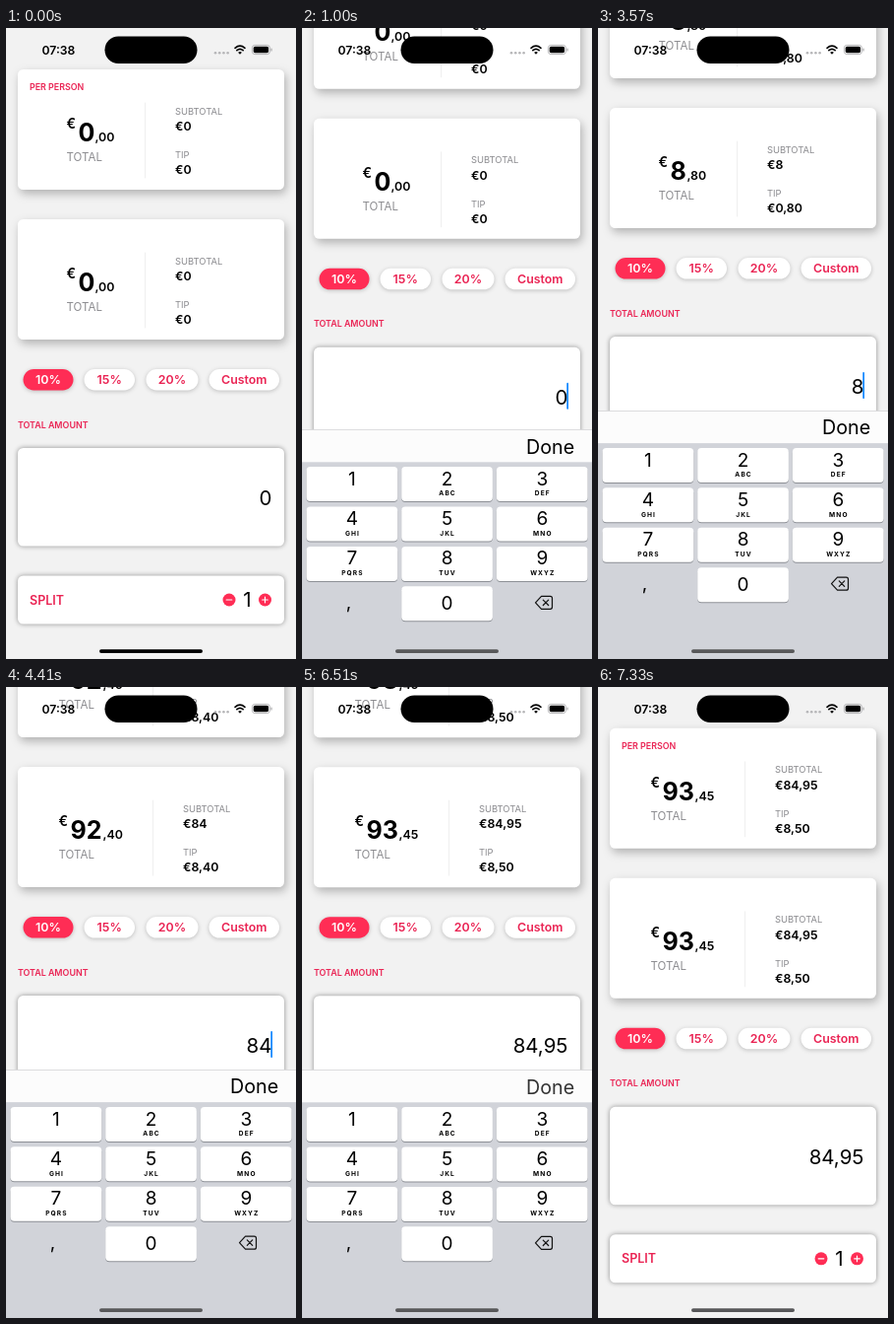
An HTML page that plays this animation: 295x640 px, repeating every 8000 ms.

```html
<!DOCTYPE html>
<html lang="en">
<head>
<meta charset="utf-8">
<title>Tip calculator</title>
<style>
  html, body { margin: 0; width: 100%; height: 100%; overflow: hidden; background: #f2f2f2; }
  svg { display: block; width: 295px; height: 640px; font-family: Inter, Roboto, sans-serif; }
  .card { fill: #fff; }
  .raised { filter: drop-shadow(2px 4px 5px rgba(0, 0, 0, .27)); }
  .outlined { filter: drop-shadow(0 0 2.5px rgba(0, 0, 0, .42)); }
  .pill { fill: #fff; filter: drop-shadow(0 1px 2px rgba(0, 0, 0, .22)); }
  .pill.on, .round { fill: #ff2d55; }
  .pink { fill: #ea2454; font-weight: 600; }
  .head { font-size: 8.9px; }
  .choice { font-size: 12.4px; text-anchor: middle; }
  .choice.on { fill: #fff; }
  .gray { fill: #8b8b8f; font-size: 9.4px; }
  .gray.big { font-size: 11.5px; }
  .sum { font-size: 12.4px; font-weight: 600; }
  .euro { font-size: 14px; font-weight: 600; }
  .whole { font-size: 25px; font-weight: 700; }
  .amount { font-size: 20.5px; text-anchor: end; }
  .key { fill: #fff; }
  .edge { fill: #8d9096; }
  .digit { font-size: 19px; text-anchor: middle; }
  .letters { font-size: 6.6px; font-weight: 700; letter-spacing: 1.1px; text-anchor: middle; }
  .line { fill: none; stroke-linecap: round; stroke-linejoin: round; }
</style>
</head>
<body>
<svg id="stage" viewBox="0 0 295 640"></svg>
<script>
const LOOP = 8000;
const stage = document.getElementById('stage');

const text = (x, y, cls, str = '', extra = '') =>
  `<text x="${x}" y="${y}" class="${cls}" ${extra}>${str}</text>`;
const box = (x, y, w, h, r, cls, extra = '') =>
  `<rect x="${x}" y="${y}" width="${w}" height="${h}" rx="${r}" class="${cls}" ${extra}/>`;
const line = (d, width, color) =>
  `<path class="line" d="${d}" stroke-width="${width}" stroke="${color}"/>`;

// Summary card; the columns spread apart as the total gets wider.
const summary = y => `<g transform="translate(0 ${y})">
  ${box(12, 0, 271, 122, 5.5, 'card raised')}
  <g class="left">
    ${text(61.5, 60, 'euro', '€')}
    ${text(73.5, 73, 'whole')}
    ${text(61.5, 93, 'gray big', 'TOTAL')}
  </g>
  ${text(90.5, 73, 'sum cents')}
  <g class="right">
    ${line('M141.5 34V110', 1, '#efefef')}
    ${text(172, 45.5, 'gray', 'SUBTOTAL')}
    ${text(172, 62, 'sum subtotal')}
    ${text(172, 90, 'gray', 'TIP')}
    ${text(172, 106, 'sum tip')}
  </g>
</g>`;

const pill = (x, w, label, on = '') =>
  box(x, 346, w, 21.5, 10.75, 'pill ' + on) +
  text(x + w / 2, 361.3, 'pink choice ' + on, label);

const stepper = (x, sign) =>
  `<circle class="round" cx="${x}" cy="580" r="6.5"/>` + line(sign, 1.2, '#fff');

const page = `<g id="page">
  ${summary(42)}
  ${text(24, 63, 'pink head', 'PER PERSON')}
  ${summary(194)}
  ${pill(17.5, 51, '10%', 'on')}${pill(79.5, 51.5, '15%')}
  ${pill(142.5, 53, '20%')}${pill(206.5, 71.5, 'Custom')}
  ${text(12, 405.5, 'pink head', 'TOTAL AMOUNT')}
  ${box(12, 426, 271, 99.5, 5.5, 'card outlined')}
  ${text(270.5, 484, 'amount', '', 'id="amount"')}
  ${box(269.3, 462, 1.7, 27, .8, '', 'id="caret" fill="#0a84ff"')}
  ${box(12, 555.5, 271, 49, 5.5, 'card outlined')}
  ${text(24, 584.5, 'pink', 'SPLIT', 'font-size="12.5"')}
  ${stepper(227, 'M224.2 580h5.6')}
  ${text(249.5, 587.3, 'amount', '1')}
  ${stepper(263.5, 'M260.7 580h5.6M263.5 577.2v5.6')}
</g>`;

const letters = ['', 'ABC', 'DEF', 'GHI', 'JKL', 'MNO', 'PQRS', 'TUV', 'WXYZ'];
const key = (n, col, row) => {
  const x = 4.5 + col * 96.7, y = 425.8 + row * 40.4, mid = x + 46.4;
  return box(x, y + 1, 92.7, 35, 4, 'edge') +
    box(x, y, 92.7, 35, 4, 'key', `id="key${n}"`) +
    text(mid, y + (n ? 18.6 : 24), 'digit', n) +
    (n ? text(mid + .5, y + 29.3, 'letters', letters[n - 1]) : '');
};

const keyboard = `<g id="keyboard">
  <rect y="388" width="295" height="34" fill="#fcfcfc"/>
  <rect y="388" width="295" height=".7" fill="#cfcfd2"/>
  ${text(228, 412.3, '', 'Done', 'id="done" font-size="19.7"')}
  <rect y="421" width="295" height="219" fill="#d1d3d9"/>
  ${letters.map((_, i) => key(i + 1, i % 3, Math.floor(i / 3))).join('')}
  ${key(0, 1, 3)}
  ${text(47.5, 569.5, 'digit', ',')}
  <path id="erase" class="line" stroke="#111" stroke-width="1.2"
    d="M243.5 557H252.5Q254.5 557 254.5 559V568Q254.5 570 252.5 570H243.5L237.5 563.5Z"/>
  <path id="cross" class="line" stroke-width="1.2" d="M245.3 560.8l5.4 5.4m0-5.4l-5.4 5.4"/>
</g>`;

const dots = [213, 217.2, 221.4, 225.6]
  .map(x => `<circle cx="${x}" cy="25.3" r="1.3" fill="#b5b5b7"/>`).join('');

const status = `
  ${text(36.5, 26.7, '', '07:38', 'font-size="12.2" font-weight="600"')}
  ${box(100.5, 8.5, 94, 27.5, 13.75, '')}
  ${dots}
  ${line('M233 20.3Q238 15.9 243 20.3M234.9 22.7Q238 20 241.1 22.7', 1.7, '#000')}
  <path d="M238 26.8l-1.9-2.1q1.9-1.5 3.8 0z"/>
  ${box(250.4, 17.4, 18, 9.2, 2.8, '', 'fill="none" stroke="#a5a5a7" stroke-width=".8"')}
  ${box(251.7, 18.7, 15.4, 6.6, 1.7, '')}
  ${box(269.5, 20.4, 1.1, 3.2, .5, '', 'fill="#a5a5a7"')}
  ${box(95, 630.2, 105, 3.8, 1.9, '', 'id="home"')}`;

stage.innerHTML = page + keyboard + status;

const $ = id => document.getElementById(id);
const each = (cls, fn) => stage.querySelectorAll('.' + cls).forEach(fn);
const fill = (cls, str) => each(cls, el => { el.textContent = str; });

// Value of the last [time, value] entry reached.
const at = (track, t) => track.filter(([start]) => start <= t).pop()[1];

const typed = [[0, '0'], [1780, ''], [3440, '8'], [4090, '84'], [4670, '84,'], [5320, '84,9'], [5680, '84,95']];
const caret = [[0, 0], [660, 1], [1470, 0], [1780, 1], [2260, .4], [2410, 0], [2660, .6], [2910, 1], [6510, 0]];
const presses = [[8, 3190, 3440], [4, 3790, 4090], [9, 5180, 5320], [5, 5550, 5680]];
const ticks = [0, 660, 780, 890, 1000, 1110, 1230, 1350, 6510, 6620, 6730, 6840, 6950, 7050].map(t => [t, t]);

// Critically damped spring from 0 to 1.
const spring = ms => {
  const x = Math.max(0, ms) * .0165;
  return 1 - (1 + x) * Math.exp(-x);
};

const plain = cents => cents % 100 ? (cents / 100).toFixed(2).replace('.', ',') : String(cents / 100);

function showSums(str) {
  const cents = Math.round((parseFloat(str.replace(',', '.')) || 0) * 100);
  const tip = Math.round(cents / 10);
  const [whole, rest] = ((cents + tip) / 100).toFixed(2).split('.');
  const spread = (whole.length - 1) * 8;
  fill('whole', whole);
  fill('cents', ',' + rest);
  fill('subtotal', '€' + plain(cents));
  fill('tip', '€' + plain(tip));
  each('left', el => el.setAttribute('transform', `translate(${-spread} 0)`));
  each('right', el => el.setAttribute('transform', `translate(${spread} 0)`));
  each('cents', el => el.setAttribute('x', 90.5 + spread));
  $('amount').textContent = str;
}

let shown = null;

function render(t) {
  const str = at(typed, t);
  if (str !== shown) showSums(shown = str);

  const s = at(ticks, t);
  const close = spring(s - 6507);
  const scroll = spring(s - 761) - close;
  const rise = spring(s - 744) - close;
  $('page').setAttribute('transform', `translate(0 ${-113 * scroll})`);
  $('keyboard').setAttribute('transform', `translate(0 ${252.5 * (1 - rise)})`);
  $('done').setAttribute('fill', t >= 6510 ? '#333' : '#000');
  $('home').setAttribute('fill', t < 500 ? '#000' : '#58585a');
  $('caret').setAttribute('opacity', at(caret, t));

  for (const [n, from, to] of presses)
    $('key' + n).style.fill = t >= from && t < to ? '#b3b7c0' : '#fff';
  const erasing = t >= 1670 && t < 1910;
  $('erase').style.fill = erasing ? '#000' : 'none';
  $('cross').setAttribute('stroke', erasing ? '#d1d3d9' : '#111');
}

const begin = performance.now();
function frame() {
  render((performance.now() - begin) % LOOP);
  requestAnimationFrame(frame);
}
frame();
</script>
</body>
</html>
```
